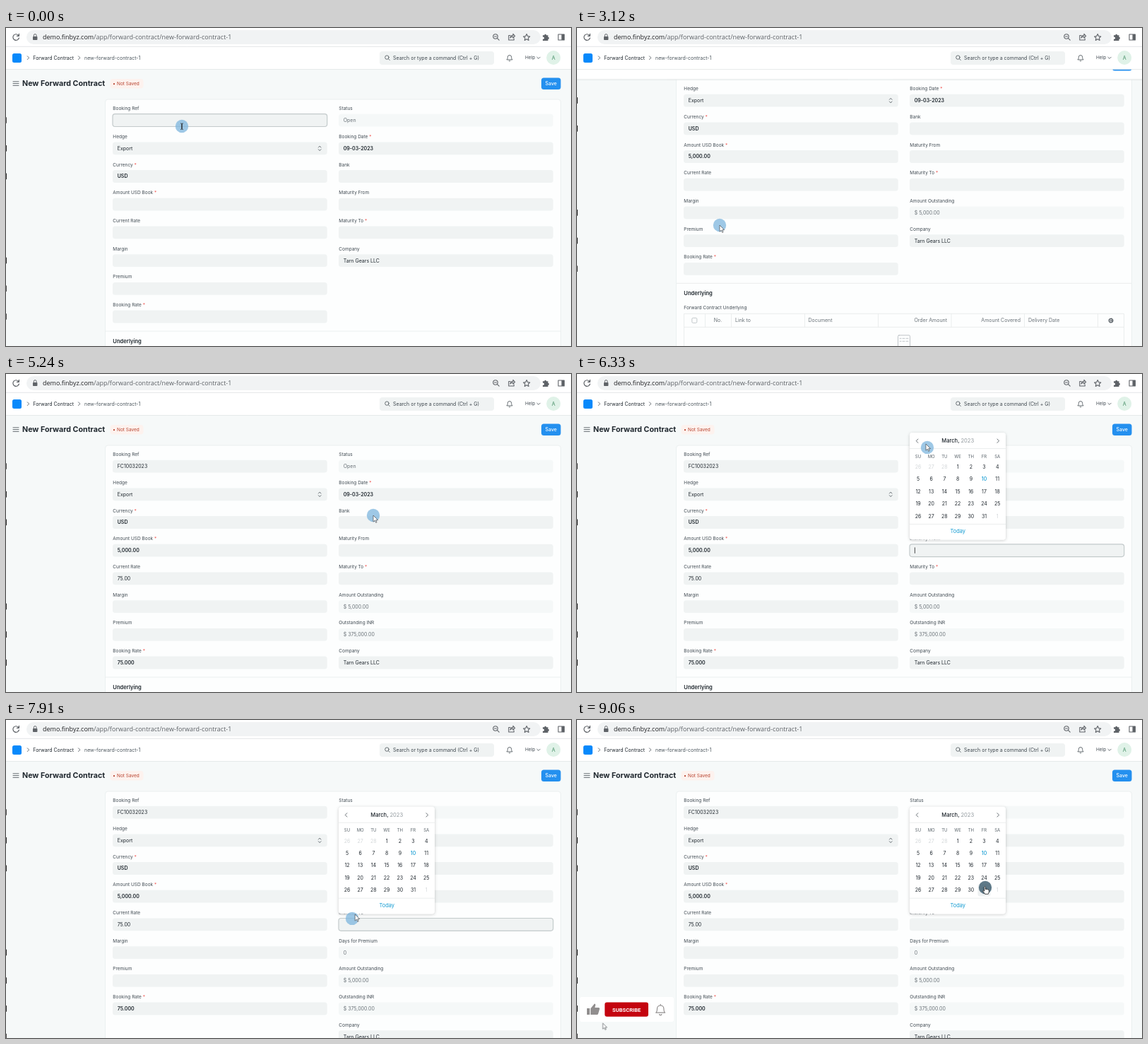
These frames come from a looping animation (800 by 450 pixels, 9090 ms). An HTML page:

```html
<!DOCTYPE html>
<html lang="en">
<head>
<meta charset="utf-8">
<title>New Forward Contract</title>
<style>
html, body { margin: 0; width: 100%; height: 100%; overflow: hidden; background: #f6f9f9; }
svg { display: block; width: 800px; height: 450px; }
text { font: 7px Inter, sans-serif; fill: #1f272e; white-space: pre; }
.label { font-size: 6.5px; fill: #404a52; }
.bold { font-weight: 600; }
.muted { fill: #6a7278; }
.mid { text-anchor: middle; }
.end { text-anchor: end; }
.star { fill: #f0544f; }
.line { fill: none; stroke: #e6eaea; stroke-width: .8; }
.icon { fill: none; stroke: #5f6368; stroke-width: 1.2; stroke-linecap: round; stroke-linejoin: round; }
.thin { stroke-width: .8; stroke: #454d54; }
.box { fill: #f0f3f3; }
.box.ro { fill: #f5f8f8; }
.box.focus { stroke: #c3cacb; stroke-width: 1.2; }
.url { font: 9px "Open Sans", sans-serif; fill: #202124; }
.cal text { text-anchor: middle; }
.cal .week { font-size: 6px; fill: #59636a; }
.cal .out { fill: #d3d7d9; }
.cal .now { fill: #129bd2; font-weight: 500; }

#page { animation: scroll 9090ms infinite; }
#head { animation: tuck 9090ms infinite; }
#headBg { animation: shade 9090ms step-end infinite; }
#widget { animation: pop 9090ms infinite; transform-origin: 70px 410px; }
#pointer2 { animation: enter 9090ms infinite; }
@keyframes scroll {
  0%, 30.6% { transform: none; }
  32.6%, 41.8% { transform: translateY(-67.7px); }
  44%, 100% { transform: none; }
}
@keyframes tuck {
  0%, 30.6% { transform: none; }
  32%, 42.4% { transform: translateY(-26.5px); }
  44%, 100% { transform: none; }
}
@keyframes shade {
  0% { opacity: 0; }
  30.7% { opacity: 1; }
  48.6% { opacity: 0; }
}
@keyframes pop {
  0%, 92.4% { opacity: 0; transform: scale(.85); }
  95.2%, 100% { opacity: 1; transform: none; }
}
@keyframes enter {
  0%, 96% { opacity: 0; transform: translate(44px, 433px); }
  97% { opacity: 1; transform: translate(42px, 432px); }
  99.4%, 100% { opacity: 1; transform: translate(36.5px, 429px); }
}
</style>
</head>
<body>
<svg viewBox="0 0 800 450">
  <defs>
    <filter id="soft" x="-10%" y="-10%" width="120%" height="125%">
      <feDropShadow dx="0" dy="1" stdDeviation="2" flood-color="#1f272e" flood-opacity=".2"/>
    </filter>
    <path id="arrow" d="M0 0V9.2L2.2 7.2 3.7 10.4 5.1 9.8 3.7 6.7H6.6Z" fill="#fff" stroke="#454a4e" stroke-width=".7"/>
  </defs>
  <rect width="800" height="450" fill="#f6f9f9"/>

  <g id="page">
    <rect x="140.5" y="101" width="645" height="560" rx="4" fill="#fdfefe" stroke="#e8ecec" stroke-width=".8"/>
    <g id="fields"></g>
    <g id="section">
      <path class="line" d="M141 429H785"/>
      <text class="bold" x="151.3" y="445.8" style="font-size:7.6px">Underlying</text>
      <text class="label" x="151.3" y="466.2">Forward Contract Underlying</text>
      <path class="line" d="M151.5 580V472H774.5V580M151.5 491H774.5M181.5 472v19M218.5 472v19M322.5 472v19M426.5 472v19M530 472v19M633.5 472v19M737.5 472v19"/>
      <rect class="line" x="162.8" y="478" width="7" height="7" rx="1.5" style="stroke:#b4bbbf"/>
      <g id="columns"></g>
      <g class="icon thin" transform="translate(756 481.7)"><circle r="1.2"/><circle r="2.8" stroke-width="1.2" stroke-dasharray="1.4 .8"/></g>
      <g class="icon" style="stroke:#b0b7bc;stroke-width:.8">
        <rect x="454.5" y="502.5" width="17" height="18" rx="1.5"/>
        <path d="M457 507h2M457 511h2M461 507h3M461 511h3M466 507h3M466 511h3"/>
      </g>
    </g>
  </g>

  <g id="head">
    <g id="headBg"><rect y="50" width="800" height="49" fill="#fff"/><path class="line" d="M0 99.3H800" style="stroke:#dfe4e4"/></g>
    <path class="icon thin" d="M10 75.8h8M10 78.6h8M10 81.4h8"/>
    <text x="23" y="82.2" style="font-size:10.7px;font-weight:700">New Forward Contract</text>
    <rect x="147.5" y="72" width="47" height="13.5" rx="4" fill="#fdf2ee"/>
    <circle cx="153" cy="79.2" r="1.1" fill="#b8432f"/>
    <text class="label" x="157" y="81.4" style="fill:#b8432f">Not Saved</text>
    <rect x="758" y="70.5" width="27.5" height="16.5" rx="3.5" fill="#2490ef"/>
    <text class="mid" x="771.8" y="81.2" style="fill:#fff;font-weight:500">Save</text>
  </g>

  <g id="navbar">
    <rect y="26" width="800" height="32.4" fill="#fff"/>
    <path class="line" d="M0 58.6H800" style="stroke:#dde3e3"/>
    <rect x="9" y="36" width="13" height="13" rx="2.5" fill="#0789fb"/>
    <path class="icon thin" d="M30.3 39.8l2.3 2.4-2.3 2.4M102.5 39.8l2.3 2.4-2.3 2.4M751.8 41.2l2.2 2.2 2.2-2.2"/>
    <text x="38.3" y="44.5">Forward Contract</text>
    <text x="111" y="44.5" style="fill:#4c565d">new-forward-contract-1</text>
    <rect x="529" y="33" width="162" height="19" rx="4" fill="#f0f3f3"/>
    <g class="icon thin"><circle cx="539.4" cy="41.6" r="2.7"/><path d="M541.4 43.6l1.9 1.9"/></g>
    <text x="548" y="44.5" style="fill:#3e474e">Search or type a command (Ctrl + G)</text>
    <path class="icon thin" d="M709.2 44.6c1.2-1 1.1-2 1.1-3.4a2.7 2.7 0 0 1 5.4 0c0 1.400-.1 2.400 1.100 3.400zM712 46.300a1.100 1.100 0 0 0 2 0"/>
    <text class="label" x="735" y="44.4">Help</text>
    <circle cx="775.2" cy="42" r="10" fill="#e0f2e8"/>
    <text class="mid" x="775.2" y="44.600" style="fill:#5b9c78;font-weight:500">A</text>
  </g>

  <g id="browser">
    <rect width="800" height="26" fill="#fff"/>
    <path class="line" d="M0 26.300H800" style="stroke:#dcdfe1"/>
    <rect x="29" y="3" width="728" height="20" rx="10" fill="#f1f3f4"/>
    <path class="icon" d="M17.800 10.700A4.300 4.300 0 1 0 18.400 14M18.400 8.300v3h-3"/>
    <rect x="38" y="12" width="6.400" height="5" rx=".8" fill="#5f6368"/>
    <path class="icon" d="M39.400 12v-1.600a1.800 1.800 0 0 1 3.600 0V12" style="stroke-width:1"/>
    <text class="url" x="52" y="16.400">demo.finbyz.com<tspan fill="#5f6368">/app/forward-contract/new-forward-contract-1</tspan></text>
    <g class="icon" style="stroke-width:1.1">
      <circle cx="693" cy="12" r="3.200"/><path d="M695.400 14.400l2.800 2.800M691.600 12h2.800"/>
      <path d="M714 10.500h-2.200v6.500h7.400v-2M714 14c.3-2.400 2-3.600 4-3.600V8.400l2.600 3-2.600 2.800v-1.900c-1.700 0-3 .4-4 1.700z"/>
      <path d="M737.200 8.600l1.400 3 3.200.4-2.400 2.200.7 3.200-2.900-1.600-2.900 1.600.7-3.200-2.400-2.200 3.200-.4z"/>
      <rect x="782" y="9" width="8.400" height="8"/>
    </g>
    <path d="M760 10.200h2.200a1.500 1.500 0 1 1 3 0h2.300v2.500a1.500 1.500 0 1 1 0 3v2.300H760v-2.400a1.500 1.500 0 1 0 0-2.800z" fill="#5f6368"/>
    <rect x="786.500" y="9" width="4" height="8" fill="#5f6368"/>
  </g>

  <g id="calendar" class="cal">
    <rect x="471" y="83" width="136" height="151.500" rx="4" fill="#fff" filter="url(#soft)"/>
    <path class="line" d="M471 105.500H607M471 212.500H607"/>
    <path class="icon thin" d="M482.800 92l-2.500 2.700 2.500 2.700M595 92l2.500 2.700-2.500 2.700"/>
    <text x="539.200" y="97.200" style="font-size:7.600px;font-weight:500">March, <tspan fill="#90989d" font-weight="400">2023</tspan></text>
    <rect id="hover" x="567.500" y="192.300" width="18" height="17.400" rx="3" fill="#eef1f2"/>
    <g id="days"></g>
    <text x="539.200" y="225.300" style="font-size:7.400px;fill:#129bd2">Today</text>
  </g>

  <g id="widget">
    <rect x="4" y="392" width="133" height="35" rx="3" fill="#fff"/>
    <g fill="#918e8e"><rect x="14" y="408" width="4" height="9"/><path d="M19.200 408.200l5.600-6.700c1.200.3 1.600 1.200 1.300 2.300l-.8 3.200h5.300c1 0 1.700.9 1.400 1.900l-2 6.800c-.3.900-.9 1.300-1.700 1.300h-9.100z"/></g>
    <rect x="39.300" y="399.500" width="61.700" height="20.300" rx="3" fill="#c4040f"/>
    <text class="mid" x="70.200" y="412.500" style="font:700 7.600px Roboto,sans-serif;fill:#fff">SUBSCRIBE</text>
    <path class="icon" d="M111.800 414.200c1.900-1.500 1.700-3.300 1.700-5.700a4.700 4.700 0 0 1 9.400 0c0 2.400-.2 4.200 1.700 5.700zM116.500 416.500a1.800 1.800 0 0 0 3.400 0M118.200 403.600v-1.200" style="stroke:#918e8e"/>
  </g>
  <g id="pointer2"><use href="#arrow" transform="scale(.9)"/></g>

  <circle id="halo" r="9.200"/>
  <g id="pointer">
    <use href="#arrow"/>
    <path d="M-1.800-4C-.8-4 0-3.600 0-2.900V3.400C0 4.100-.8 4.500-1.800 4.500M1.800-4C.8-4 0-3.600 0-2.900V3.400C0 4.100.8 4.500 1.800 4.500" fill="none" stroke="#222" stroke-width=".9"/>
    <path d="M-1.200-.5c0-1.200 1.700-1.200 1.700 0v3.100c2.100-.3 4.800.2 4.800 1.600v2.200l-1 2.900H-.3L-3 5.500c-.5-.9.400-1.600 1.100-1l.7.700z" fill="#fff" stroke="#222" stroke-width=".8"/>
  </g>
</svg>

<script>
const LOOP = 9090, PITCH = 39.7, TRAIL = 50;
const $ = id => document.getElementById(id);

function add(parent, tag, attrs, text) {
  const el = document.createElementNS("http://www.w3.org/2000/svg", tag);
  for (const key in attrs) el.setAttribute(key, attrs[key]);
  if (text !== undefined) el.textContent = text;
  return parent.appendChild(el);
}

// Latest value whose time has been reached.
const step = (t, stops) => stops.filter(s => s[0] <= t).pop()[1];
const typed = (t, start, gap, text) => text.slice(0, Math.max(0, Math.floor((t - start) / gap) + 1));

function field(x, row, name, { value = "", required, bold = required, ro, from = 0 } = {}) {
  const g = add($("fields"), "g", {});
  const label = add(g, "text", { class: "label", x: x + .3, y: 116.3 }, name);
  if (required) add(label, "tspan", { class: "star" }, " *");
  const box = add(g, "rect", { class: ro ? "box ro" : "box", x, y: 121.7, width: 303.7, height: 17.8, rx: 3.5 });
  const text = add(g, "text", { class: (bold ? "bold" : "") + (ro ? " muted" : ""), x: x + 6.7, y: 133.1 }, value);
  const caret = add(g, "rect", { y: 126.3, width: .8, height: 8.4, fill: "#222" });
  const place = i => g.setAttribute("transform", `translate(0 ${i * PITCH})`);
  place(row);
  return { g, box, text, caret, x, from, place };
}

const left = [
  ["Booking Ref"], ["Hedge", { value: "Export" }], ["Currency", { value: "USD", required: true }],
  ["Amount USD Book", { required: true }], ["Current Rate"], ["Margin"], ["Premium"],
  ["Booking Rate", { required: true }]
].map(([name, opts], i) => field(151, i, name, opts));
const right = [
  ["Status", { value: "Open", ro: true }], ["Booking Date", { value: "09-03-2023", required: true }],
  ["Bank"], ["Maturity From"], ["Maturity To", { required: true }],
  ["Days for Premium", { value: "0", ro: true, from: 7380 }],
  ["Amount Outstanding", { value: "$ 5,000.00", ro: true, from: 2700 }],
  ["Outstanding INR", { value: "$ 375,000.00", ro: true, from: 3720 }],
  ["Company", { value: "Tarn Gears LLC" }]
].map(([name, opts], i) => field(471, i, name, opts));
add(left[1].g, "path", { class: "icon thin", d: "M442.4 129.300l1.800-1.900 1.800 1.900M442.400 132l1.800 1.900 1.800-1.900" });

const [ref, , , amount, rate, , , booked] = left;
const [, , , dateFrom, dateTo] = right;
const inputs = [ref, amount, rate, dateFrom, dateTo];

[["No.", 199.5, "mid"], ["Link to", 224, ""], ["Document", 327.5, ""], ["Order Amount", 524, "end"],
 ["Amount Covered", 628, "end"], ["Delivery Date", 639, ""]]
  .forEach(([name, x, cls]) => add($("columns"), "text", { class: "muted " + cls, x, y: 484.200 }, name));

const colX = i => 483 + i % 7 * 18.7;
"SU MO TU WE TH FR SA".split(" ").forEach((d, i) => add($("days"), "text", { class: "week", x: colX(i), y: 118.7 }, d));
for (let i = 0; i < 35; i++) {
  const out = i < 3 || i > 33;
  const day = i < 3 ? 26 + i : out ? 1 : i - 2;
  add($("days"), "text", {
    class: out ? "out" : day === 10 ? "now" : "",
    x: colX(i), y: 134 + Math.floor(i / 7) * 17.4
  }, day);
}

const path = [
  [0, 249, 139], [1300, 249, 139], [1620, 192, 222], [1670, 190, 227], [1850, 188, 250], [2650, 188, 250],
  [2900, 202, 279], [3150, 202, 279], [3350, 190, 222], [3780, 190, 222], [4220, 508, 199], [4270, 515, 192],
  [4600, 520, 200], [5300, 520, 200], [5600, 497, 250], [5800, 497, 250], [6280, 496, 104], [6330, 494, 99],
  [6450, 490, 95], [6600, 490, 95], [7000, 577, 149], [7400, 577, 149], [7650, 488, 288], [7790, 488, 288],
  [7860, 490, 281], [7910, 494, 275], [8500, 578, 237], [LOOP, 578, 237]
];
function spot(t) {
  const i = Math.max(1, path.findIndex(p => p[0] >= t));
  const [t0, x0, y0] = path[i - 1], [t1, x1, y1] = path[i];
  const k = (t - t0) / (t1 - t0);
  return `translate(${x0 + (x1 - x0) * k} ${y0 + (y1 - y0) * k})`;
}

const ARROW = 0, BEAM = 1, HAND = 2;
const shapes = [[0, BEAM], [1300, ARROW], [1810, BEAM], [2700, ARROW], [3310, BEAM], [3800, ARROW],
  [5540, BEAM], [5830, ARROW], [6940, HAND], [7440, ARROW], [7620, BEAM], [7840, ARROW], [8470, HAND]];
const focus = [[0, ref], [1900, amount], [2700, null], [3380, rate], [3720, null],
  [5700, dateFrom], [7380, null], [7780, dateTo], [9000, null]];
const clicks = [1880, 3360, 5680, 7340, 7740, 9000];

function draw(t) {
  ref.text.textContent = typed(t, 300, 100, "FC10032023");
  amount.text.textContent = t < 2700 ? typed(t, 2050, 120, "5000") : "5,000.00";
  rate.text.textContent = t < 3720 ? typed(t, 3470, 110, "75") : "75.00";
  booked.text.textContent = t < 3720 ? "" : "75.000";
  dateFrom.text.textContent = t < 7380 ? "" : "10-03-2023";

  let row = 0;
  for (const f of right) {
    const on = t >= f.from;
    f.g.style.display = on ? "" : "none";
    if (on) f.place(row++);
  }
  $("section").setAttribute("transform", `translate(0 ${t >= 7380 ? PITCH : 0})`);

  const active = step(t, focus);
  const blink = Math.floor(t / 530) % 2;
  for (const f of inputs) {
    f.box.classList.toggle("focus", f === active);
    f.caret.style.display = f === active && blink ? "" : "none";
    if (f === active) f.caret.setAttribute("x", f.x + 6.9 + f.text.getComputedTextLength());
  }

  const second = t >= 7780;
  $("calendar").style.display = second || active === dateFrom ? "" : "none";
  $("calendar").setAttribute("transform", `translate(0 ${second ? PITCH : 0})`);
  $("hover").style.display = t >= 8470 ? "" : "none";

  const pressed = clicks.some(c => t >= c && t < c + 130);
  $("halo").setAttribute("transform", spot(Math.max(0, t - TRAIL)));
  $("halo").setAttribute("fill", pressed ? "#426273" : "#7db5de");
  $("halo").setAttribute("fill-opacity", pressed ? .85 : .75);
  $("pointer").setAttribute("transform", spot(t));
  const shape = step(t, shapes);
  [...$("pointer").children].forEach((el, i) => el.style.display = i === shape ? "" : "none");
}

const start = performance.now();
function tick() {
  draw((performance.now() - start) % LOOP);
  requestAnimationFrame(tick);
}
draw(0);
requestAnimationFrame(tick);
</script>
</body>
</html>
```
